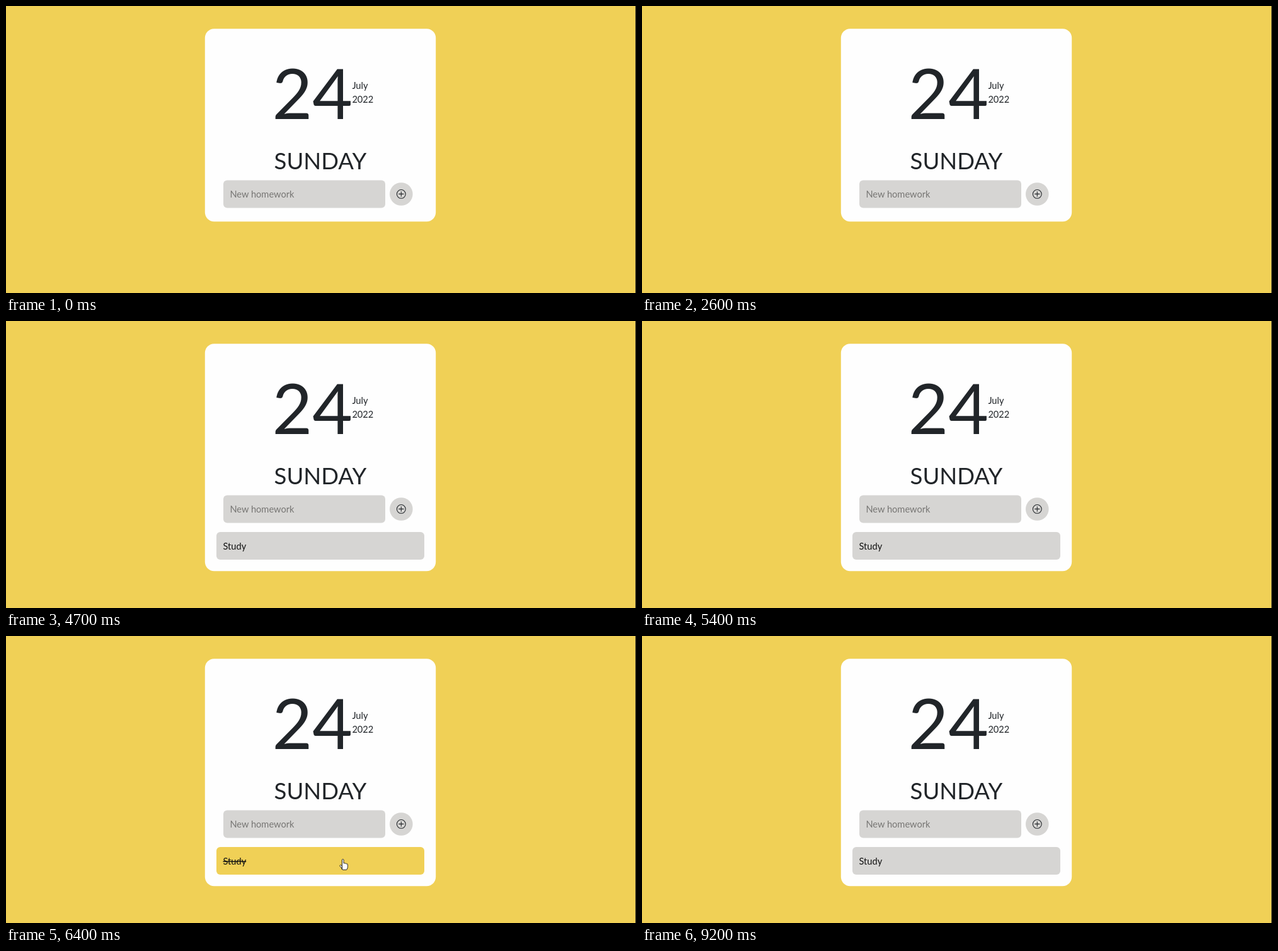
An HTML page for the animation above (9900 ms loop, 1000x457 px).

```html
<!DOCTYPE html>
<html lang="en">
<head>
<meta charset="utf-8">
<title>Homework list</title>
<style>
  html, body { margin: 0; width: 100%; height: 100%; overflow: hidden; background: #f0d056; }
  svg { display: block; width: 1000px; height: 457px; }
  text { font: 14.64px Lato, sans-serif; fill: #212529; white-space: pre; }
  #day { font-size: 110px; }
  #weekday { font-size: 36.6px; }
  .field { fill: #d6d5d3; }
  .icon { fill: none; stroke: #212529; stroke-width: 1.1; stroke-linecap: round; }
  .pointer { fill: #fff; stroke: #222; stroke-width: 1; stroke-linejoin: round; }
</style>
</head>
<body>
<svg viewBox="0 0 1000 457">
  <rect width="1000" height="457" fill="#f0d056"/>
  <rect x="999" width="1" height="457" fill="#2b2a22"/>
  <rect id="card" x="315.8" y="36.2" width="366.4" height="307" rx="14.6" fill="#fefefe"/>
  <text id="day" x="422.4" y="179.5">24</text>
  <text x="549.4" y="132">July</text>
  <text x="549.4" y="154">2022</text>
  <text id="weekday" x="425.6" y="260.4">SUNDAY</text>

  <rect class="field" x="345" y="277.5" width="257" height="44" rx="6"/>
  <text id="entry" x="355.4" y="305"></text>
  <rect id="caret" y="291" width="1" height="17" fill="#111"/>
  <circle class="field" cx="627.3" cy="299.5" r="18.3"/>
  <g class="icon" transform="translate(627.3 299.4)">
    <circle r="6.9"/>
    <path d="M-3.6 0H3.6M0-3.6V3.6"/>
  </g>

  <g id="item">
    <rect id="itemBox" x="334" y="336" width="330" height="44" rx="6"/>
    <text id="itemText" x="344.5" y="363.8" style="fill:#111">Study</text>
  </g>

  <g id="mouse" class="pointer">
    <path id="hand" d="M-1.6 9V-6.2Q-1.6-7.6-.3-7.6T1-6.2V-1Q2.2-2 3.3-.8Q4.5-1.5 5.4-.2Q7.4-.8 7.4 1.6V4.6Q7.4 7 5.6 9.3H-.6Q-1.6 7.2-4.6 3.9Q-5.8 2.3-4.4 1.7T-1.6 3.4Z"/>
    <path id="arrow" d="M0-8V7L3.4 3.9 5.7 9 8 8 5.7 3H10.2Z"/>
  </g>
</svg>
<script>
const LOOP = 9900;
const [card, entry, caret, item, itemBox, itemText, mouse, hand, arrow] =
  ['card', 'entry', 'caret', 'item', 'itemBox', 'itemText', 'mouse', 'hand', 'arrow']
    .map(id => document.getElementById(id));

const caretOn = [[1300, 1700], [2100, 2600], [3200, 4400], [4900, 5400], [6000, 6400]];
const typing = [[3500, 'S'], [3600, 'St'], [3700, 'Stud'], [3900, 'Study'], [4700, '']];
const route = [[5700, 578, 448], [6000, 540, 369], [6200, 535, 363], [8900, 535, 363], [9200, 585, 470]];

const within = (t, [from, to]) => t >= from && t < to;
const show = (node, on) => node.style.display = on ? '' : 'none';

function pointerAt(t) {
  const i = route.findIndex((stop, k) => k && t < stop[0]);
  const [t0, x0, y0] = route[i - 1], [t1, x1, y1] = route[i];
  const p = (t - t0) / (t1 - t0);
  return [x0 + (x1 - x0) * p, y0 + (y1 - y0) * p];
}

function draw(time) {
  const t = Math.floor(time % LOOP / 100) * 100;
  const added = t >= 4700, done = within(t, [6400, 7400]);

  card.setAttribute('height', added ? 362 : 307);
  show(item, added);
  itemBox.style.fill = done ? '#f0d056' : '#d6d5d3';
  itemText.style.textDecoration = done ? 'line-through' : 'none';

  const value = typing.reduce((text, [at, next]) => t >= at ? next : text, '');
  entry.textContent = value || 'New homework';
  entry.style.fill = value ? '#111' : '#777674';
  caret.setAttribute('x', 355.4 + (value ? entry.getComputedTextLength() : 0));
  show(caret, caretOn.some(span => within(t, span)));

  const visible = within(t, [5700, 9200]);
  show(mouse, visible);
  if (visible) {
    const [x, y] = pointerAt(t), over = y > 336 && y < 380;
    mouse.setAttribute('transform', `translate(${x} ${y})`);
    show(hand, over);
    show(arrow, !over);
  }
}

const start = performance.now();
(function tick() {
  draw(performance.now() - start);
  requestAnimationFrame(tick);
})();
</script>
</body>
</html>
```
